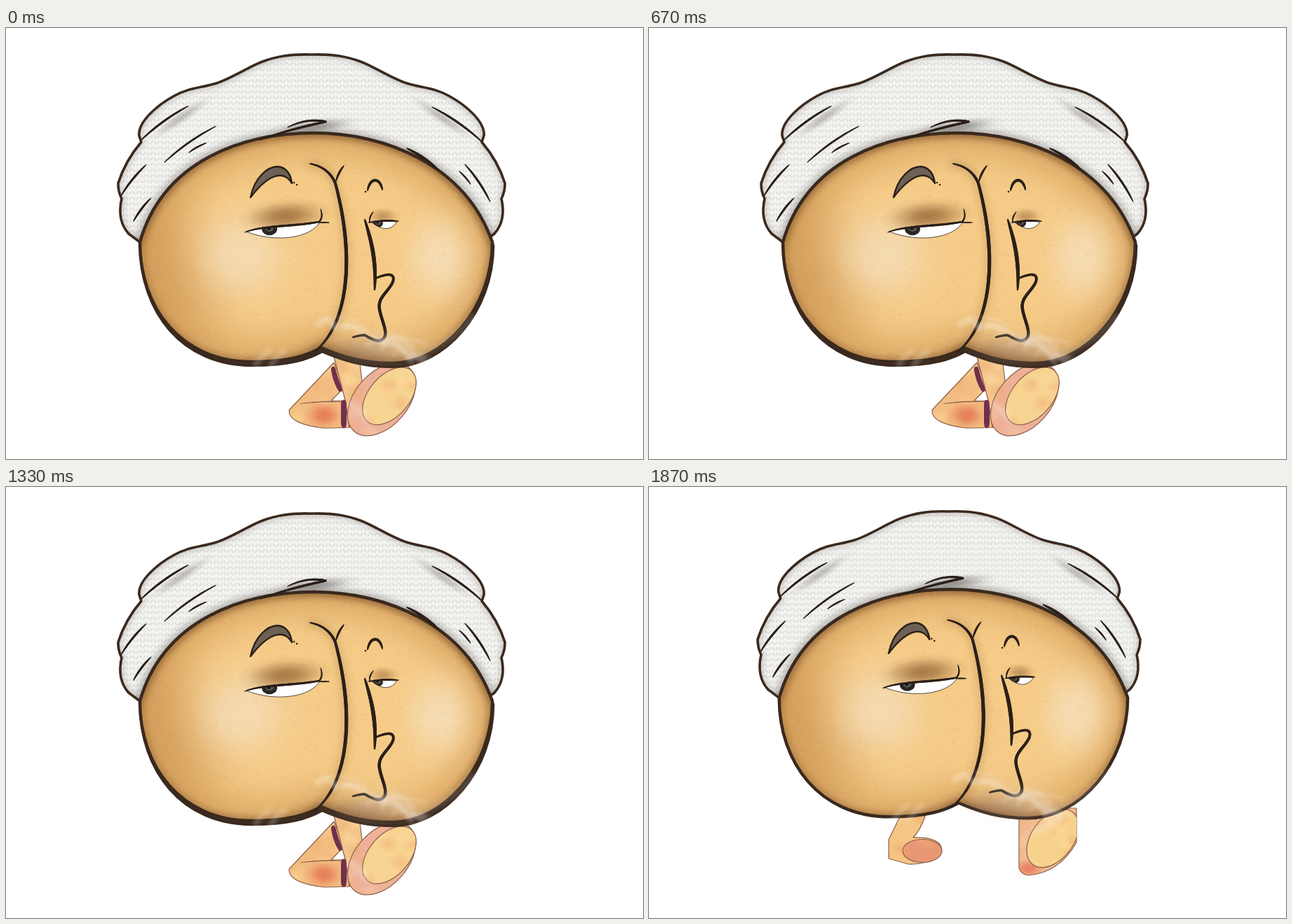
An HTML page with a canvas that plays this animation: 909 px wide and 616 px high, repeating every 1.99 s.

```html
<!DOCTYPE html>
<html>
<head>
<meta charset="utf-8">
<title>Walking head</title>
<style>
  html, body { margin: 0; width: 100%; height: 100%; overflow: hidden; background: #fff; }
  canvas { display: block; width: 100vw; height: 100vh; }
</style>
</head>
<body>
<canvas id="stage" width="909" height="616"></canvas>
<script>
const W = 909, H = 616, LOOP = 1990, MID = 436;
const INK = '#3a291e', LINE = '#2b2019', FOOT_LINE = '#8a5f4b';
const stage = document.getElementById('stage').getContext('2d');
let g;

function random(seed) {
  return () => (seed = (seed * 16807) % 2147483647) / 2147483647;
}

function makeCanvas(w, h) {
  const c = document.createElement('canvas');
  c.width = w;
  c.height = h;
  return c;
}

function oval(x, y, rx, ry, turn = 0) {
  const path = new Path2D();
  path.ellipse(x, y, rx, ry, turn, 0, 7);
  return path;
}

function fill(path, color) {
  g.fillStyle = color;
  g.fill(path);
}

function outline(path, width, color = INK, blur = 0) {
  g.save();
  if (blur) g.filter = `blur(${blur}px)`;
  g.strokeStyle = color;
  g.lineWidth = width;
  g.lineJoin = g.lineCap = 'round';
  g.stroke(path);
  g.restore();
}

function clipped(path, draw) {
  g.save();
  g.clip(path);
  draw();
  g.restore();
}

function glow(x, y, rx, ry, rgb, alpha, turn = 0) {
  g.save();
  g.translate(x, y);
  g.rotate(turn);
  g.scale(rx, ry);
  const r = g.createRadialGradient(0, 0, 0, 0, 0, 1);
  for (let k = 0; k <= 4; k++)
    r.addColorStop(k / 4, `rgba(${rgb},${alpha * (1 + Math.cos(Math.PI * k / 4)) / 2})`);
  g.fillStyle = r;
  g.fillRect(-1, -1, 2, 2);
  g.restore();
}

// Pen line that swells in the middle and thins at both ends.
function brush(d, width, tip = 0.3, color = LINE) {
  const curve = document.createElementNS('http://www.w3.org/2000/svg', 'path');
  curve.setAttribute('d', d);
  const length = curve.getTotalLength(), steps = Math.ceil(length / 2);
  g.strokeStyle = color;
  g.lineCap = 'round';
  for (let k = 0; k < steps; k++) {
    const a = curve.getPointAtLength(length * k / steps);
    const b = curve.getPointAtLength(length * (k + 1) / steps);
    g.lineWidth = width * (tip + (1 - tip) * Math.sqrt(Math.sin(Math.PI * (k + 0.5) / steps)));
    g.beginPath();
    g.moveTo(a.x, a.y);
    g.lineTo(b.x, b.y);
    g.stroke();
  }
}

// Slightly bowed crease, given by its start, length and direction in degrees.
function crease(x, y, length, degrees, width = 3) {
  const a = degrees * Math.PI / 180, dx = Math.cos(a) * length, dy = Math.sin(a) * length;
  brush(`M${x} ${y} q${dx / 2 + dy * 0.07} ${dy / 2 - dx * 0.07} ${dx} ${dy}`, width);
}

const RIM = 'C655 195 540 150 440 150 S225 188 191 306';
const face = new Path2D('M191 306 C191 400 250 477 350 477 C405 477 430 468 450 457 ' +
  'C480 470 510 479 550 479 C625 479 694 400 694 306 ' + RIM + 'Z');
const rim = new Path2D('M694 306 ' + RIM);
const CLEFT = 'M434 194 C455 198 465 210 470 222 C488 290 490 350 479 395 Q468 440 440 463';

// The wrap is one half profile and its mirror image; the face covers the inside.
const half = new Path2D('M436 38 C404 37 385 41 366 48 S322 72 300 79 S264 84 240 97 ' +
  'S188 134 190 154 L193 163 Q170 190 160 222 Q160 234 165 244 Q158 275 175 294 L191 306 H436');
const wrap = new Path2D(half);
wrap.addPath(half, new DOMMatrix([-1, 0, 0, 1, 2 * MID, 0]));

function knit() {
  const tile = makeCanvas(10, 8), t = tile.getContext('2d');
  t.fillStyle = '#f2f2f0';
  t.fillRect(0, 0, 10, 8);
  t.strokeStyle = '#dadad5';
  t.lineWidth = 1.6;
  for (const side of [-1, 1]) {
    t.beginPath();
    t.moveTo(5 + side * 4, 1.5);
    t.lineTo(5 + side, 5.5);
    t.stroke();
  }
  return g.createPattern(tile, 'repeat');
}

function drawWrap() {
  fill(wrap, knit());
  clipped(wrap, () => {
    outline(wrap, 7, 'rgba(80,74,66,.3)', 4);
    outline(rim, 14, 'rgba(80,74,66,.35)', 5);
    glow(440, 141, 70, 13, '85,80,74', 0.5, -0.13);
    for (const x of [250, 2 * MID - 250])
      glow(x, 128, 60, 10, '100,95,88', 0.35, x < MID ? -0.6 : 0.6);
  });
  outline(wrap, 3.6);
}

function drawCreases() {
  crease(192, 161, 84, -36);
  crease(226, 192, 90, -35, 2.6);
  crease(261, 178, 28, -29, 2.4);
  crease(164, 240, 57, -51);
  crease(182, 276, 41, -53);
  crease(608, 113, 88, 35);
  crease(572, 172, 53, 34, 4);
  crease(647, 205, 24, 49, 2.4);
  crease(655, 195, 64, 56);
  brush('M362 160 Q400 146 456 134 Q430 128 402 142', 3.4);
}

function drawSkin() {
  fill(face, '#f5cb87');
  clipped(face, () => {
    outline(face, 60, 'rgba(196,138,70,.5)', 20);
    outline(face, 12, 'rgba(120,76,38,.5)', 5);
    glow(235, 350, 120, 190, '196,138,72', 0.5, -0.3);
    glow(335, 325, 100, 95, '245,220,180', 0.95);
    glow(618, 328, 72, 92, '246,222,184', 0.9);
    outline(new Path2D(CLEFT), 10, 'rgba(150,98,48,.3)', 6);
    outline(rim, 12, 'rgba(112,68,28,.35)', 6);
    glow(500, 470, 110, 36, '92,55,35', 0.45);
    const rnd = random(71);
    for (let i = 0; i < 2600; i++) {
      g.fillStyle = i % 2 ? 'rgba(255,232,180,.12)' : 'rgba(150,95,40,.08)';
      g.fillRect(190 + rnd() * 505, 150 + rnd() * 325, 3, 1.3);
    }
  });
  outline(face, 4.5);
}

function drawEye(d, x, y, r) {
  const white = new Path2D(d);
  fill(white, '#fff');
  clipped(white, () => {
    fill(oval(x, y, r, r * 0.85), '#292723');
    fill(oval(x, y - 1, r * 0.55, r * 0.45), '#5a5851');
    fill(oval(x - 1, y - 1, r * 0.25, r * 0.25), '#11100f');
  });
  outline(white, 0.8, LINE);
}

function drawFeatures() {
  brush(CLEFT, 5);
  brush('M471 219 Q474 207 482 197', 3);

  glow(398, 269, 70, 27, '128,78,36', 0.65, -0.08);
  drawEye('M343 291 C365 282 410 284 448 277 C436 300 385 308 343 291', 376, 287, 11);
  brush('M341 292 C365 282 410 284 447 277 Q453 270 449 259', 3.2);
  brush('M447 278 H461', 2);
  const brow = new Path2D('M349 242 C355 212 374 198 388 198 Q405 200 408 222 C395 200 372 212 349 242');
  fill(brow, '#6d6054');
  outline(brow, 2.4, LINE);
  fill(oval(411, 221, 1.3, 1.3), LINE);
  fill(oval(415, 224, 1.3, 1.3), LINE);

  glow(538, 269, 26, 14, '135,85,42', 0.45);
  drawEye('M522 278 Q540 275 558 277 Q545 296 522 278', 531, 279, 7);
  brush('M517 278 Q540 274 560 276', 2.6);
  brush('M519 278 Q518 270 524 263', 2);
  brush('M516 232 C520 212 534 214 537 231', 4);
  fill(oval(513, 234, 1.3, 1.3), LINE);

  brush('M512 274 C520 300 529 330 526 374', 5.5);
  brush('M527 358 C545 350 556 350 552 363 C545 378 530 385 533 402 ' +
    'C536 418 543 430 541 440 C536 452 524 446 512 439 Q505 439 495 442', 4.4, 0.5);
}

function drawSteam() {
  const rnd = random(19);
  for (let i = 0; i < 16; i++) {
    const u = rnd(), x = 445 + u * 130, y = 412 + u * 40 + rnd() * 22;
    const curl = new Path2D(`M${x} ${y} q${10 + rnd() * 20} ${-18 * rnd()} ${20 + rnd() * 40} ${4 + rnd() * 14}`);
    outline(curl, 2 + rnd() * 9, `rgba(255,250,246,${0.1 + rnd() * 0.15})`, 2);
  }
  for (const x of [356, 378])
    outline(new Path2D(`M${x} 482 q8 -14 20 -20`), 6, 'rgba(255,250,246,.3)', 3);
  outline(new Path2D('M585 467 Q640 450 666 412'), 9, 'rgba(255,250,246,.15)', 3);
  glow(530, 456, 90, 36, '240,225,215', 0.25);
}

function drawHead() {
  drawWrap();
  drawSkin();
  drawCreases();
  drawFeatures();
  drawSteam();
}

// Watercolour skin: flat tone with seeded pale and warm patches.
function limb(path, color, x, y, seed, pale = '255,222,155') {
  const rnd = random(seed);
  fill(path, color);
  clipped(path, () => {
    for (let i = 0; i < 14; i++)
      glow(x + (rnd() - 0.5) * 90, y + (rnd() - 0.5) * 90, 10 + rnd() * 12, 8 + rnd() * 10,
        i % 2 ? pale : '240,170,115', 0.45);
  });
  outline(path, 1.2, FOOT_LINE);
}

function crossedFeet() {
  const left = new Path2D('M468 478 L404 546 Q402 566 455 572 L490 571 V533 H464 L482 514 Z');
  limb(left, '#f2bd80', 445, 530, 11);
  clipped(left, () => glow(453, 553, 30, 24, '228,112,80', 0.85));
  brush('M420 537 Q450 533 484 534', 1.3, 0.3, FOOT_LINE);
  brush('M467 487 Q470 503 477 517', 7, 0.8, '#71304d');
  limb(new Path2D('M468 470 H504 L508 505 Q506 550 490 571 L484 532 Z'), '#f3c48a', 490, 515, 23);
  brush('M482 535 V568', 8, 0.8, '#71304d');
  limb(oval(536, 531, 60, 38, -0.86), '#edb197', 530, 535, 37, '245,195,165');
  limb(oval(547, 526, 48, 29, -0.86), '#f7d491', 545, 527, 41);
  outline(new Path2D('M492 538 Q508 545 514 562'), 8, 'rgba(255,255,255,.28)', 3);
}

function steppingFeet() {
  limb(new Path2D('M361 465 H396 Q388 490 377 501 Q418 500 418 520 Q405 540 370 539 L342 531 V504 Z'),
    '#f4c583', 365, 505, 13);
  limb(oval(390, 520, 28, 16.5), '#e89674', 390, 520, 29, '240,160,125');
  const right = new Path2D('M528 468 L590 459 H610 V508 Q585 552 541 555 Q527 552 528 540 Z');
  limb(right, '#f0ba90', 560, 505, 43, '248,207,150');
  clipped(right, () => {
    glow(541, 545, 26, 17, '230,118,90', 0.85);
    limb(oval(576, 502, 47, 30, -0.93), '#f5d18c', 575, 505, 47);
  });
  glow(570, 480, 45, 14, '255,246,235', 0.35, -0.6);
}

function makePose(draw) {
  const layer = makeCanvas(W, H);
  g = layer.getContext('2d');
  g.fillStyle = '#fff';
  g.fillRect(0, 0, W, H);
  draw();
  return layer;
}

const low = makePose(() => {
  crossedFeet();
  // The lower pose has a heavier underside.
  g.save();
  g.translate(1, 5);
  fill(face, '#4f3828');
  outline(face, 4.5);
  g.restore();
  drawHead();
});

const high = makePose(() => {
  steppingFeet();
  g.setTransform(0.989, 0, 0, 0.994, -3.2, -2.8);
  drawHead();
});

const flips = [200, 330, 530, 670, 870, 1000, 1200, 1330, 1530, 1670, 1870];
const start = performance.now();

function render() {
  const t = (performance.now() - start) % LOOP;
  const count = flips.filter(f => f <= t).length;
  stage.drawImage(count % 2 ? high : low, 0, 0);
  requestAnimationFrame(render);
}
render();
</script>
</body>
</html>
```
